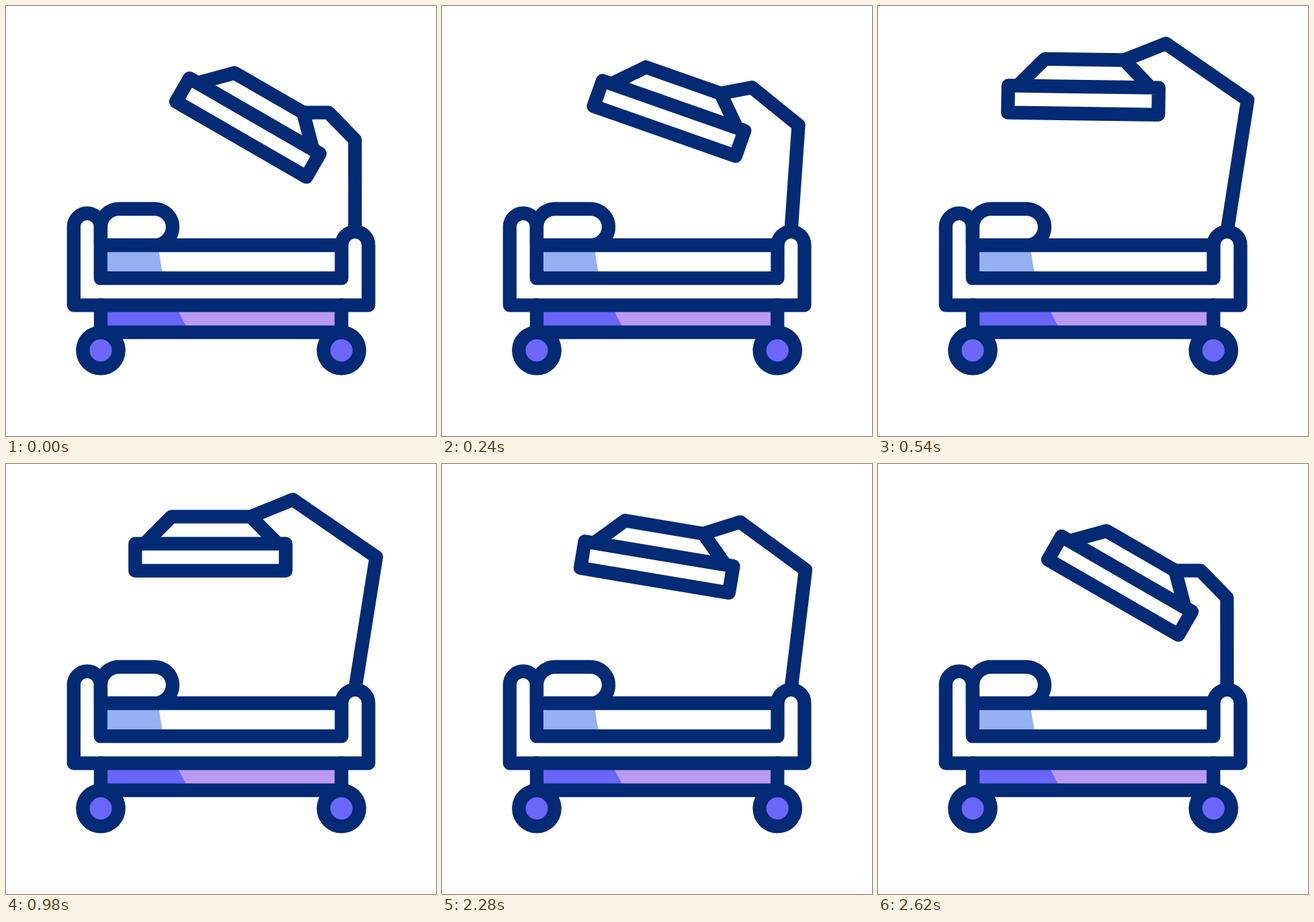
Recreate the animation shown at these times as an HTML page. Size 640 by 640 pixels, loop 3 s.

```html
<!DOCTYPE html>
<html lang="en">
<head>
<meta charset="utf-8">
<title>Hospital bed with lamp</title>
<style>
  html, body { margin: 0; height: 100%; overflow: hidden; background: #fff; }
  svg { display: block; width: 100vw; height: 100vh; }
  .line { fill: none; stroke: #032a75; stroke-width: 20.3; stroke-linecap: round; stroke-linejoin: round; }
</style>
</head>
<body>
<svg viewBox="0 0 640 640">
  <path fill="#95b1f3" d="M141 356H227Q229 381 235 405H141Z"/>
  <path fill="#ba9af2" d="M141 445H499V486H141Z"/>
  <path fill="#6865f8" d="M141 445H253Q259 462 274 486H141Z"/>
  <g class="line">
    <path d="M141 445V485.6H499.3V445"/>
    <g fill="#6c66f9">
      <circle cx="141" cy="512.6" r="26.7"/>
      <circle cx="499.3" cy="512.6" r="26.7"/>
    </g>
    <path d="M141 356V329a27 27 0 0 1 27-27H221a27 27 0 0 1 0 54M141 356H499"/>
    <path d="M140.8 405.2V328.5a20 20 0 0 0-40 0V445.3H539.5V355.9a20 20 0 0 0-40 0V405.2Z"/>
    <polyline id="arm"/>
    <!-- The lamp's origin is its joint with the arm. -->
    <path id="lamp" d="M-158 40.4L-118 0H0L40 40.4M-172 40.4H52V80.6H-172Z"/>
  </g>
</svg>
<script>
  const LOOP = 3000;
  const arm = document.getElementById('arm');
  const lamp = document.getElementById('lamp');

  // Joint, bend, elbow and base of the arm
  const lowered = [[442.3, 158.6], [480, 158.6], [519.4, 199], [519.5, 335.7]];
  const raised = [[364.3, 78.3], [427, 53], [551, 138.3], [519.5, 335.7]];

  const ease = (t, start, end) => {
    const x = Math.min(1, Math.max(0, (t - start) / (end - start)));
    return x * x * (3 - 2 * x);
  };

  function draw(now) {
    const t = now % LOOP;
    const lift = ease(t, 0, 600) - ease(t, 2090, 2600);
    const points = lowered.map((p, i) => p.map((v, k) => v + (raised[i][k] - v) * lift));
    arm.setAttribute('points', points.join(' '));
    lamp.setAttribute('transform', `translate(${points[0]}) rotate(${30 * (1 - lift)})`);
    requestAnimationFrame(() => draw(performance.now()));
  }
  draw(0);
</script>
</body>
</html>
```
